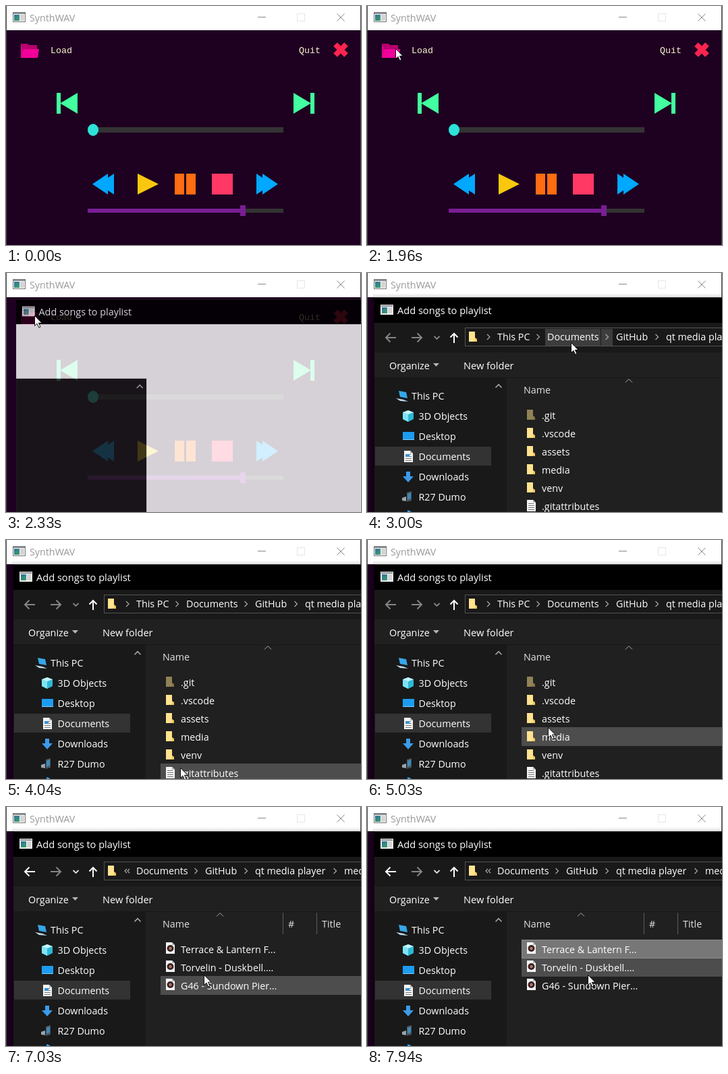
Recreate the animation shown at these times as an HTML page. Size 526 by 355 pixels, loop 8 s.

```html
<!DOCTYPE html>
<html lang="en">
<head>
<meta charset="utf-8">
<title>Media player file dialog</title>
<style>
  html, body { margin: 0; width: 100%; height: 100%; overflow: hidden; background: #1e0021; }
  svg { display: block; width: 526px; height: 355px; }
  text { font: 14.3px "Open Sans", "Noto Sans", sans-serif; fill: #fff; white-space: pre; }
  .title { font-size: 14.6px; }
  .mono { font: 13.3px "Liberation Mono", "DejaVu Sans Mono", monospace; fill: #fff4d2; }
  .line { fill: none; }
</style>
</head>
<body>
<svg id="stage" viewBox="0 0 526 355"></svg>
<script>
const LOOP = 8000;
const stage = document.getElementById('stage');

const rect = (x, y, w, h, fill, extra = '') =>
  `<rect x="${x}" y="${y}" width="${w}" height="${h}" fill="${fill}" ${extra}/>`;
const shape = (d, fill) => `<path d="${d}" fill="${fill}"/>`;
const line = (d, color, width = 1, extra = '') =>
  `<path class="line" d="${d}" stroke="${color}" stroke-width="${width}" ${extra}/>`;
const text = (x, y, s, extra = '') =>
  `<text x="${x}" y="${y}" ${extra}>${s.replace(/&/g, '&amp;')}</text>`;
const group = (id, body) => `<g id="${id}">${body}</g>`;
const at = (x, y, body) => `<g transform="translate(${x} ${y})">${body}</g>`;

// Icons
const appIcon = (x, y, border) => at(x, y,
  rect(.5, .5, 18, 14, '#f4f4f4', `stroke="${border}"`) + rect(1, 1, 17, 2, '#8a8f96') +
  rect(2, 4, 8, 9, 'url(#pane)') + rect(11, 4, 6, 9, '#d4d4d4'));
const folder = (x, y, opacity = 1) => at(x, y, `<g opacity="${opacity}">` +
  shape('M0 0H9V9L12 11V15H0Z', '#f0c65c') + shape('M0 0H8L9 2V14L2 15H0Z', '#ffe38f') + '</g>');
const page = (x, y) => at(x, y,
  shape('M0 0H9L13 4V17H0Z', '#f5f5f5') + shape('M9 0V4H13Z', '#b8b8b8'));
const textFile = (x, y) => page(x, y) +
  at(x, y, line('M2 5.5H10M2 8.5H11M2 11.5H11M2 14.5H11', '#777'));
const audioFile = (x, y) => page(x, y) + at(x, y,
  '<circle cx="6.5" cy="9" r="5" fill="#3a2226"/><circle cx="6.5" cy="9" r="2" fill="#e9a07c"/>' +
  '<circle cx="6.5" cy="9" r=".8" fill="#222"/>');
const chevron = (x, y) => line(`M${x - 2} ${y - 4}l4 4l-4 4`, '#aaa', 1.2);
const upChevron = (x, y, size = 5, width = 1) =>
  line(`M${x - size} ${y + size / 2}l${size} ${-size}l${size} ${size}`, '#aaa', width);
const scrollUp = x => upChevron(x, 168, 4.5, 1.6);
const navArrows = (back, drop) => line('M43 96H28M34.5 89.5L28 96L34.5 102.5', back, 2) +
  line('M99.5 94L103.5 98L107.5 94', drop, 1.8);

const defs = `<defs>
  <linearGradient id="pane" x2=".6" y2="1"><stop stop-color="#2f6f9f"/><stop offset="1" stop-color="#3c9a72"/></linearGradient>
  <linearGradient id="shadeX"><stop stop-opacity="0"/><stop offset="1" stop-opacity=".4"/></linearGradient>
  <linearGradient id="shadeY" x2="0" y2="1"><stop stop-opacity="0"/><stop offset="1" stop-opacity=".13"/></linearGradient>
</defs>`;

const player = () => {
  const green = '#42ff9f', blue = '#00a8ff';
  return rect(0, 0, 526, 355, '#1e0021') + rect(1, 0, 524, 36, '#fff') +
    appIcon(10, 9, '#777') + text(35, 23, 'SynthWAV', 'id="appTitle"') +
    `<g id="controls" class="line">
      <path d="M373 16.5H385M490.5 11.5L501.5 22.5M501.5 11.5L490.5 22.5"/></g>` +
    rect(431.5, 11.5, 11, 11, 'none', 'stroke="#e6e6e6"') +
    line('M.5 0V355M525.5 0V355', '#444') +
    shape('M22 56H32L34 58H46V66H22Z', '#b8006c') + shape('M22 60H25V77H22Z', '#d9008a') +
    shape('M26 64H49L47 77H22Z', '#f2009a') +
    text(66, 70, 'Load', 'class="mono"') + text(434, 70, 'Quit', 'class="mono"') +
    line('M488 57L504 73M504 57L488 73', '#ff2450', 8) +
    shape('M75 129H81V144L106 129V160L81 145V160H75Z', green) +
    shape('M457 129H451V144L426 129V160L451 145V160H457Z', green) +
    rect(121, 180, 290, 8, '#333') +
    '<ellipse cx="129" cy="184" rx="8" ry="9" fill="#2de2d8"/>' +
    shape('M128 264.5L151 249V280ZM137 264.5L160 249V280Z', blue) +
    shape('M195 249L226 264.5L195 280Z', '#f9c80e') +
    shape('M250 249H264V280H250ZM267 249H281V280H267Z', '#ff6c11') +
    rect(305, 249, 31, 31, '#ff3864') +
    shape('M394 264.5L371 249V280ZM403 264.5L380 249V280Z', blue) +
    rect(121, 301, 290, 6, '#333') + rect(121, 301, 230, 6, '#791e94') +
    rect(347, 296, 8, 16, '#791e94');
};

const dialogTitle = () => rect(11, 36, 560, 38, '#000') + line('M11 36.5H570', '#262626') +
  appIcon(20, 47, '#e8e8e8') + text(45, 61, 'Add songs to playlist', 'class="title"');

const blankDialog = () => dialogTitle() + rect(11, 74, 560, 300, '#fff') +
  rect(11, 156, 196, 220, '#191919') + scrollUp(197);

const crumbs = (items, lead) => lead +
  items.map(([x, name]) => text(x, 100, name)).join('') +
  items.slice(1).map(([x]) => chevron(x - 13.5, 95)).join('');

const sidebar = () => {
  const names = ['3D Objects', 'Desktop', 'Documents', 'Downloads', 'R27 Dumo'];
  return rect(11, 156, 196, 199, '#191919') + rect(12, 258, 172, 28, '#333') +
    scrollUp(195) + text(66, 188, 'This PC') +
    names.map((name, i) => text(76.5, 218 + i * 30, name)).join('') +
    shape('M47 175L58 177L60 186L49 184Z', '#35a7e8') + shape('M43 186L54 188L61 191L49 190Z', '#bcdcec') +
    shape('M53 207L61 204L69 207V217L61 221L53 217Z', '#2cb9d6') +
    shape('M53 207L61 210V221L53 217Z', '#7fe3f2') + shape('M53 207L61 204L69 207L61 210Z', '#c4f3fa') +
    rect(53, 236, 17, 12, '#1c9cf0') + rect(53, 247, 17, 1, '#7fd0ff') +
    textFile(55, 264) + rect(57, 269, 6, 4, '#3a92d0') +
    shape('M58 295H64V302H69L61 311L53 302H58Z', '#3b9bea') +
    shape('M52 334L58 332V339L52 338Z', '#9aa4aa') + shape('M59 326L66 324V338L59 340Z', '#4a525a') +
    shape('M60 328L65 326V335L60 337Z', '#3f87b8') +
    shape('M60 352L65 354V355H60Z', '#2f9df0');
};

const frame = () => rect(1, 36, 10, 319, 'url(#shadeX)') + rect(9, 30, 516, 6, 'url(#shadeY)') +
  dialogTitle() + rect(11, 74, 515, 44, '#191919') + rect(11, 118, 515, 38, '#202020') +
  rect(207, 156, 319, 199, '#202020') + line('M11 155.5H526', '#161616') +
  rect(145.5, 81.5, 400, 27, '#191919', 'stroke="#535353"') +
  group('crumbHot', rect(264, 83, 82, 25, '#3d3d3d') + rect(347, 83, 17, 25, '#3d3d3d')) +
  line('M66 96H81M74.5 89.5L81 96L74.5 102.5', '#858585', 2) +
  line('M129 104V90M123.5 95.5L129 90L134.5 95.5', '#fff', 2) +
  folder(151, 87) + text(33, 143, 'Organize') + shape('M98 134H107L102.5 139Z', '#b5b5b5') +
  text(143, 143, 'New folder', 'class="title"') + sidebar();

const rowTop = i => 197 + i * 27;
const listing = (names, icon) => names.map((name, i) =>
  icon(i) + text(259, rowTop(i) + 20, name)).join('');

const projectView = () => navArrows('#858585', '#858585') +
  crumbs([[193, 'This PC'], [267, 'Documents'], [369, 'GitHub'], [443, 'qt media player']], chevron(180, 95)) +
  group('projectList', text(232, 179, 'Name', 'fill-opacity=".87"') + upChevron(388, 160) +
    listing(['.git', '.vscode', 'assets', 'media', 'venv', '.gitattributes'],
      i => i < 5 ? folder(237, rowTop(i) + 6, i ? 1 : .5) : textFile(237, rowTop(i) + 5)));

const mediaView = () => navArrows('#fff', '#ddd') +
  crumbs([[193, 'Documents'], [295, 'GitHub'], [369, 'qt media player'], [501, 'media']],
    line('M179 92l-3 3l3 3M183 92l-3 3l3 3', '#aaa', 1.2)) +
  [[232, 'Name'], [418, '#'], [468, 'Title']].map(([x, s]) => text(x, 179, s, 'fill-opacity=".87"')).join('') +
  upChevron(317, 160) + line('M410.5 157V189M460.5 157V189', '#5c5c5c') +
  listing(['Terrace & Lantern F...', 'Torvelin - Duskbell....', 'G46 - Sundown Pier...'],
    i => audioFile(237, rowTop(i) + 4));

stage.innerHTML = defs + player() + group('blank', blankDialog()) +
  group('dialog', frame() +
    rect(211, 157, 315, 32, '#434343', 'id="headHot"') +
    rect(229, 0, 297, 28, '#4d4d4d', 'id="hover"') +
    rect(229.5, .5, 300, 27, '#777', 'id="picked" stroke="#8a8a8a"') +
    group('project', projectView()) + group('media', mediaView())) +
  `<path id="cursor" d="M.5 .5V15.5L4 12.2L6.6 18L9 17L6.4 11.3H11Z" fill="#fff" stroke="#000" stroke-width=".9"/>`;

const el = id => document.getElementById(id);
const show = (id, on) => { el(id).style.display = on ? '' : 'none'; };

// Pointer stops: time, x, y, hovered row
const AWAY = -50;
const pointer = [
  [0, AWAY, AWAY], [430, 470, -8], [550, AWAY, AWAY], [830, 477, 46], [950, 298, 59],
  [1200, 205, 60], [1320, 140, 62], [1440, 80, 62], [1560, 48, 63], [1680, 42, 63],
  [2850, 298, 98], [3000, 302, 103], [3800, 322, 65], [3920, 290, 165], [4040, 258, 338, 5],
  [4160, 262, 257, 2], [5030, 268, 278, 3], [5150, 270, 275, 2], [5270, 272, 268, 2],
  [5800, 280, 284, 3], [5950, 284, 290, 3], [6500, 284, 290], [7030, 293, 249, 2],
  [7150, 300, 232, 1], [7270, 310, 212, 0], [7540, 314, 213, 0], [7940, 327, 249, 1]
];
// Opening steps: time, scale, x, y, opacity
const opening = [[2210, .96, 11, 10, .4], [2330, .985, 4.2, 3.2, .82]];
const current = (steps, t) => steps.filter(s => s[0] <= t).pop();
const within = (t, from, to) => t >= from && t < to;

function placeRow(id, row) {
  show(id, row !== undefined);
  if (row !== undefined) el(id).setAttribute('transform', `translate(0 ${rowTop(row)})`);
}

function draw(t) {
  const active = within(t, 1680, 1960);
  el('appTitle').style.fill = active ? '#000' : '#999';
  el('controls').setAttribute('stroke', active ? '#000' : '#888');

  const [, x, y, row] = current(pointer, t);
  el('cursor').setAttribute('transform', `translate(${x} ${y})`);

  const fading = within(t, 2210, 2450);
  show('blank', fading);
  if (fading) {
    const [, scale, dx, dy, opacity] = current(opening, t);
    el('blank').setAttribute('transform', `matrix(${scale} 0 0 ${scale} ${dx} ${dy})`);
    el('blank').setAttribute('opacity', opacity);
  }

  show('dialog', t >= 2450);
  show('project', t < 6500);
  show('projectList', t >= 2570);
  show('media', t >= 6500);
  show('crumbHot', within(t, 3000, 3800));
  show('headHot', within(t, 3920, 4040));
  placeRow('hover', row);
  placeRow('picked', within(t, 6350, 6500) ? 3 : t >= 7420 ? 0 : undefined);
}

const start = performance.now();
function tick() {
  draw((performance.now() - start) % LOOP);
  requestAnimationFrame(tick);
}
tick();
</script>
</body>
</html>
```
